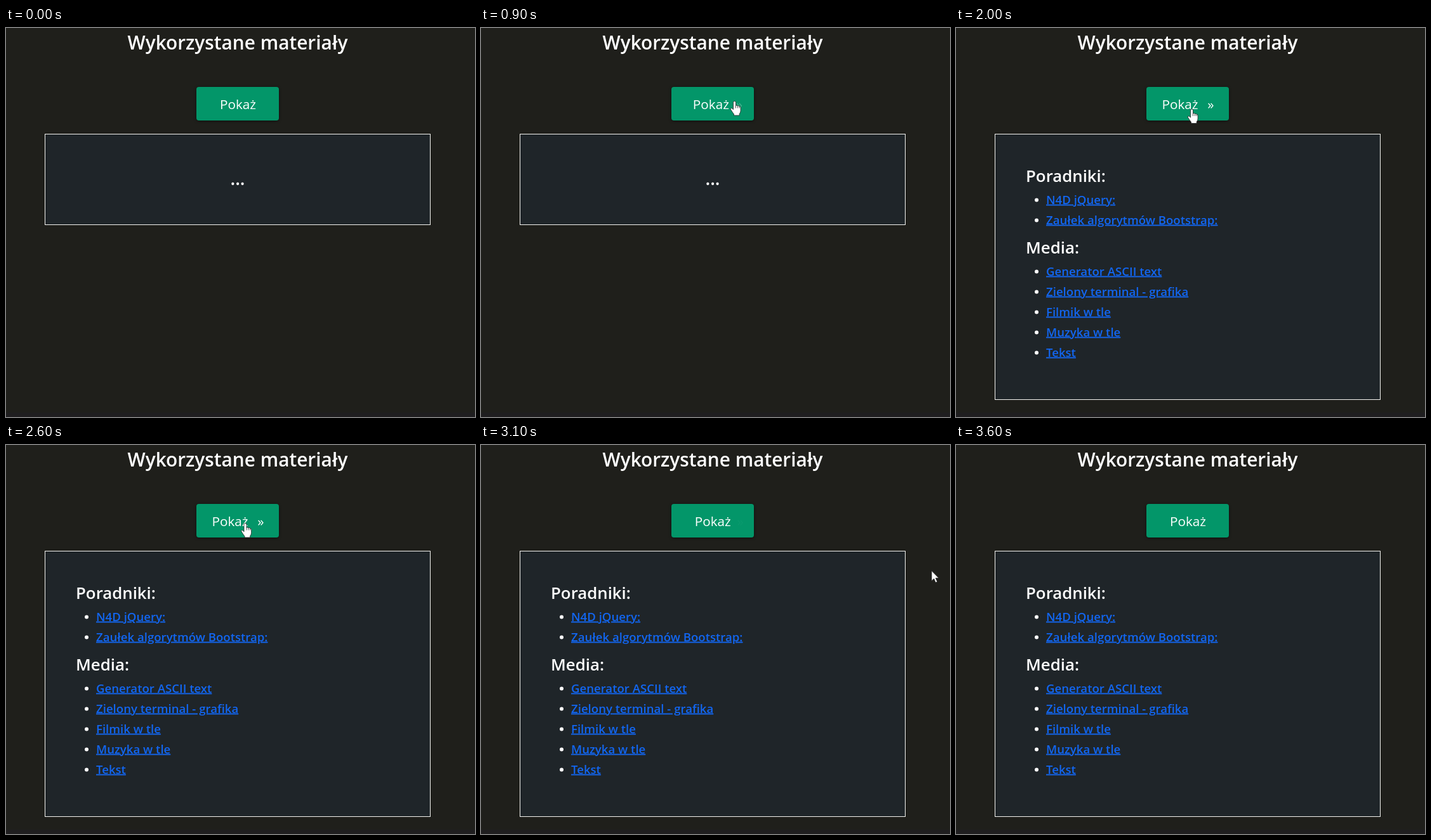
Write an HTML page that moves like this. It is 739 px wide and 614 px high and loops after 4.5 s.

```html
<!DOCTYPE html>
<html lang="pl">
<head>
<meta charset="utf-8">
<title>Wykorzystane materiały</title>
<style>
  html, body { margin: 0; width: 100%; height: 100%; overflow: hidden; background: #1f1f1b; }
  svg { display: block; width: 739px; height: 614px; }
  text { font-family: "Open Sans", "Noto Sans", sans-serif; font-weight: 600; fill: #fff; }
  .title { font-size: 29.8px; text-anchor: middle; }
  .dots { font-size: 28px; text-anchor: middle; }
  .heading { font-size: 25.8px; }
  .link { font-size: 18.6px; fill: #1266f1; text-decoration: underline; }
  .button text { font-size: 20.7px; font-weight: 400; }
  .button rect { filter: drop-shadow(0 1px 2px #0008); }
  .cursor { fill: #fff; stroke: #222; stroke-width: .8; stroke-linejoin: round; }
</style>
</head>
<body>
<svg viewBox="0 0 739 614">
  <rect y="607" width="739" height="7" fill="#1f1e20"/>
  <text class="title" x="365" y="34">Wykorzystane materiały</text>
  <g class="button">
    <rect x="300" y="93" width="130" height="53" rx="4" fill="#039669"/>
    <text id="label" y="128" text-anchor="middle">Pokaż</text>
    <text id="chevron" y="128" text-anchor="end">»</text>
  </g>
  <rect id="panel" x="61.5" y="167.5" width="607" fill="#1f2529" stroke="#f4f4f0"/>
  <text id="dots" class="dots" x="365" y="248">...</text>
  <g id="list"></g>
  <g id="cursor" class="cursor">
    <path id="arrow" d="M0 0V16L3.7 12.6 6.3 18.6 9 17.5 6.4 11.6H11.3Z"/>
    <g id="hand">
      <path d="M-2 2Q-2 0 0 0T2 2V7Q3.5 5.8 5 7.5 6.7 6.5 7.7 8.3 9.6 7.8 9.6 10V15Q9.6 18 7.7 20V22.5H-1V20.5Q-3 18-5.8 13.5-6.8 11.7-5.4 11-4 10.6-2 13.3Z"/>
      <path d="M2 7V11M5 7.5V11M7.7 8.3V11" fill="none"/>
    </g>
  </g>
</svg>
<script>
const LOOP = 4500, STEP = 100, HOVER_IN = 810, HOVER_OUT = 2700, OPEN = 2000, FADE = 500;
const $ = id => document.getElementById(id);

function setAttrs(el, attrs) {
  for (const [name, value] of Object.entries(attrs)) el.setAttribute(name, value);
}

function add(tag, attrs, content = '') {
  const el = document.createElementNS($('list').namespaceURI, tag);
  setAttrs(el, attrs);
  el.textContent = content;
  $('list').append(el);
}

function addSection(heading, y, links) {
  add('text', { class: 'heading', x: 110, y }, heading);
  links.forEach((link, i) => {
    const baseline = y + 34.5 + i * 32;
    add('circle', { cx: 127, cy: baseline - 6, r: 3, fill: '#fff' });
    add('text', { class: 'link', x: 142, y: baseline }, link);
  });
}

addSection('Poradniki:', 243, ['N4D jQuery:', 'Zaułek algorytmów Bootstrap:']);
addSection('Media:', 356, ['Generator ASCII text', 'Zielony terminal - grafika',
  'Filmik w tle', 'Muzyka w tle', 'Tekst']);

// Pointer tip: time, x, y
const path = [
  [100, 692, 616], [300, 600, 420], [500, 505, 265], [700, 452, 182],
  [800, 425, 147], [900, 399.5, 115.5], [1200, 384, 123], [1400, 371.5, 128],
  [2500, 371.5, 128], [2600, 377, 123.5], [2700, 433, 132], [2900, 600, 166],
  [3100, 710, 198.5], [3300, 745, 205]
];

function tipAt(t) {
  const i = path.findIndex(point => point[0] > t);
  if (i < 1) return [-100, -100];
  const [t0, x0, y0] = path[i - 1], [t1, x1, y1] = path[i];
  const k = (t - t0) / (t1 - t0);
  return [x0 + (x1 - x0) * k, y0 + (y1 - y0) * k];
}

// CSS "ease": cubic-bezier(.25, .1, .25, 1)
function ease(x) {
  if (x <= 0 || x >= 1) return x <= 0 ? 0 : 1;
  const bezier = (s, a, b) => 3 * s * (1 - s) ** 2 * a + 3 * s * s * (1 - s) * b + s ** 3;
  let low = 0, high = 1;
  for (let i = 0; i < 20; i++) {
    const mid = (low + high) / 2;
    if (bezier(mid, .25, .25) < x) low = mid; else high = mid;
  }
  return bezier(low, .1, 1);
}

function draw(now) {
  const t = Math.floor(now % LOOP / STEP) * STEP;
  const hover = ease((t - HOVER_IN) / FADE) - ease((t - HOVER_OUT) / FADE);
  const over = t >= HOVER_IN && t < HOVER_OUT;
  const open = t >= OPEN;

  setAttrs($('label'), { x: 365.5 - 12.5 * hover });
  setAttrs($('chevron'), { x: 414 - 7.5 * hover, opacity: hover });
  setAttrs($('panel'), { height: open ? 419 : 143 });
  $('dots').style.display = open ? 'none' : '';
  $('list').style.display = open ? '' : 'none';

  setAttrs($('cursor'), { transform: `translate(${tipAt(t)})` });
  $('hand').style.display = over ? '' : 'none';
  $('arrow').style.display = over ? 'none' : '';
  requestAnimationFrame(draw);
}
requestAnimationFrame(draw);
</script>
</body>
</html>
```
